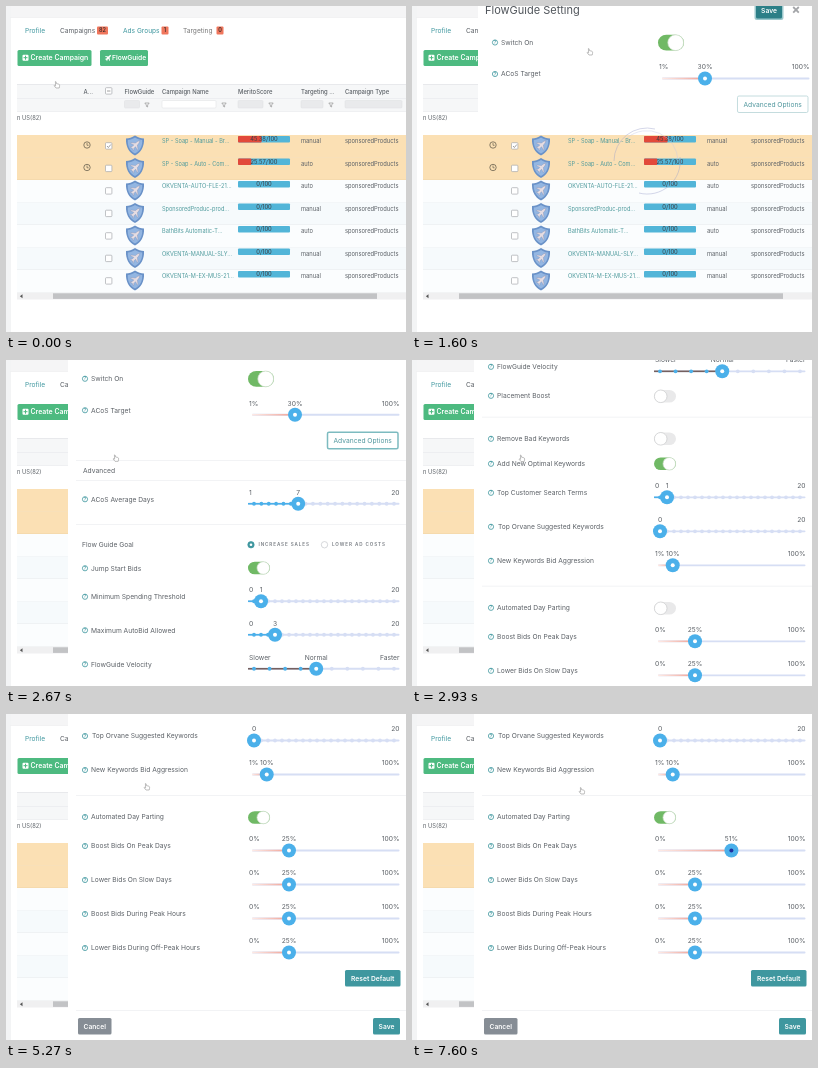
These frames come from a looping animation (400 by 326 pixels, 8000 ms). An HTML page:

```html
<!DOCTYPE html>
<html lang="en">
<head>
<meta charset="utf-8">
<title>Campaign settings</title>
<style>
html, body { margin: 0; width: 100%; height: 100%; overflow: hidden; background: #fff; }
svg { display: block; width: 100vw; height: 100vh; font-family: Inter, Roboto, sans-serif; }
</style>
</head>
<body>
<svg id="stage" viewBox="0 0 400 326"></svg>
<script>
const TEAL = '#3f979f', INK = '#5b6066', BLUE = '#4bb0ea', PALE = '#d6def4', GREEN = '#4dba80';
const stage = document.getElementById('stage');

// ---- drawing helpers, all return markup; text y is the middle of the line ----
const text = (x, y, s, size = 6.7, fill = INK, more = '') =>
  `<text x="${x}" y="${y + size * 0.36}" font-size="${size}" fill="${fill}" ${more}>${s}</text>`;
const rect = (x, y, w, h, fill, more = '') =>
  `<rect x="${x}" y="${y}" width="${w}" height="${h}" fill="${fill}" ${more}/>`;
const circle = (x, y, r, fill, more = '') =>
  `<circle cx="${x}" cy="${y}" r="${r}" fill="${fill}" ${more}/>`;
const path = (d, fill = 'none', more = '') => `<path d="${d}" fill="${fill}" ${more}/>`;
const group = (id, body, more = '') => `<g id="${id}" ${more}>${body}</g>`;
const MID = ' text-anchor="middle"', END = ' text-anchor="end"';
const BOLD = ' font-weight="600"', MEDIUM = ' font-weight="500"';
const stroke = (color, w = 0.7) => ` stroke="${color}" stroke-width="${w}"`;

const PLANE = 'M5-5L2.2-4L.6-2.4L-4-3L-4.6-2.2L-1.2-.6L-3 1.2L-4.6 1L-5 1.6L-2.8 2.8L-1.6 5L-1 4.6L-1.2 3L.6 1.2L2.2 4.6L3 4L2.4-.6L4-2.2Z';
const SHIELD = 'M0-10C3-8 6-7 9-7C9.5 1 6 7 0 10C-6 7-9.5 1-9-7C-6-7-3-8 0-10Z';
const FUNNEL = 'M-2.2-2H2.2L.6 0V2L-.6 1.4V0Z';
const HAND = 'M-1.6-3.4C-.9-3.6-.6-3-.5-1.4L1.8-.8C2.8-.4 2.8.6 2.2 3H-1L-2.8.8C-2.9 0-2 .2-1.4 .8Z';

// ---- campaign page ----
function badge(x, w, s) {
  return rect(x, 20.5, w, 8, '#f0765c', 'rx="1"') + text(x + w / 2, 24.5, s, 5.5, '#43312e', MID + BOLD);
}

function checkbox(y, mark = '') {
  return rect(99.5, y - 3.3, 6.4, 6.4, '#fff', 'rx=".8"' + stroke('#a6aaae')) + path(mark, 'none', stroke('#888', 0.8));
}

function tableRow([name, mode, score], i) {
  const y = 129 + i * 22.5, picked = i < 2;
  let s = rect(11, y, 389, 22.5, picked ? '#fbe0b4' : i % 2 ? '#f6fafc' : '#fbfdfe') +
    rect(11, y + 22, 389, 0.5, picked ? '#efd3a4' : '#e6e8eb');
  if (picked) s += circle(81, y + 10, 3.2, 'none', stroke('#6b6250', 0.8)) +
    path(`M81 ${y + 8}V${y + 10.3}H82.6`, 'none', stroke('#6b6250', 0.7));
  s += checkbox(y + 11, i ? '' : `M101 ${y + 11}l1.4 1.5 2.4-3`);
  s += `<g transform="translate(129 ${y + 10.5})">${path(SHIELD, '#6a92c8')}` +
    `<g transform="scale(.8)">${path(SHIELD, '#93b6e2')}</g>${path(PLANE, '#e6dde2', stroke('#7f8fb4', 0.4))}</g>`;
  s += text(156, y + 6.3, name, 5.6, '#4e9a9c');
  s += rect(232, y + 1, 52, 6.5, '#52b5d8', 'rx="1"');
  if (score) s += rect(232, y + 1, score * 0.52, 6.5, '#e2493a', 'rx="1"');
  return s + text(258, y + 4.3, `${score || 0}/100`, 5.8, '#3a3f45', MID) +
    text(295, y + 6.3, mode, 5.8) + text(339, y + 6.3, 'sponsoredProducts', 5.8);
}

function page() {
  const rows = [
    ['SP - Soap - Manual - Br...', 'manual', 45.38], ['SP - Soap - Auto - Com...', 'auto', 25.57],
    ['OKVENTA-AUTO-FLE-21...', 'auto'], ['SponsoredProduc-prod...', 'manual'],
    ['BathBits Automatic-T...', 'auto'], ['OKVENTA-MANUAL-SLY...', 'manual'],
    ['OKVENTA-M-EX-MUS-21...', 'manual']
  ];
  const heads = [[77.5, 'A...'], [118.5, 'FlowGuide'], [156, 'Campaign Name'], [232, 'MeritoScore'],
    [295, 'Targeting ...'], [339, 'Campaign Type']];
  const filters = [[118.5, 15, 141], [156, 54, 218], [232, 25, 265], [295, 22, 325], [339, 57, 410]];
  return rect(0, 0, 400, 326, '#fff') + rect(0, 0, 400, 11, '#f5f5f6') + rect(0, 0, 5, 326, '#f3f4f5') +
    rect(4.5, 11, 396, 0.6, '#e9eaec') +
    text(19, 24.5, 'Profile', 6.6, TEAL) + text(54, 24.5, 'Campaigns', 6.6) + badge(91, 11, '82') +
    text(117, 24.5, 'Ads Groups', 6.6, TEAL) + badge(155.5, 7, '1') +
    text(177, 24.5, 'Targeting', 6.6, '#777') + badge(210.5, 7, '0') +
    rect(11.5, 44, 74, 16, GREEN, 'rx="1.5"') + rect(16.5, 48.7, 6, 6, '#fff', 'rx="1"') +
    path('M19.5 49.7v4M17.5 51.7h4', 'none', stroke(GREEN, 1)) +
    text(24.5, 52, 'Create Campaign', 6.9, '#fff', BOLD) +
    rect(94, 44, 48, 16, GREEN, 'rx="1.5"') +
    path(PLANE, '#fff', 'transform="translate(102 52) scale(.65)"') + text(106, 52, 'FlowGuide', 6.7, '#fff', BOLD) +
    rect(11, 78, 389, 27.5, '#f6f7f8') + rect(11, 78, 389, 0.6, '#dfe1e4') + rect(11, 92, 389, 0.5, '#e3e5e8') +
    rect(11, 105, 389, 0.5, '#e3e5e8') +
    heads.map(([x, s]) => text(x, 85.5, s, 5.9, INK, MEDIUM)).join('') + checkbox(85, 'M101 85h3.4') +
    filters.map(([x, w, f], i) => rect(x, 94.5, w, 7.5, i == 1 ? '#fff' : '#e9eaec', 'rx="1"' + stroke('#dcdee1', 0.5)) +
      path(FUNNEL, 'none', `transform="translate(${f} 99)"` + stroke('#888', 0.6))).join('') +
    text(11, 112, 'n US(82)', 5.8) + rows.map(tableRow).join('') +
    rect(11, 287, 389, 6.5, '#f0f0f1') + rect(47, 287.3, 324, 5.6, '#c2c3c5') +
    path('M16.5 288.3v4l-2.6-2z', '#555');
}

// ---- settings drawer ----
const help = y => circle(79, y, 2.6, '#fff', stroke(TEAL, 0.8)) + text(79, y, '?', 4.4, TEAL, MID + BOLD);
const label = (y, s) => help(y) + text(85, y, s);
const rule = y => rect(70, y, 330, 0.6, '#e9ebee');
const spot = (lo, hi, v) => 248 + 140 * (v - lo) / (hi - lo);

function button(x, y, w, h, s, fill) {
  return rect(x, y, w, h, fill, 'rx="1.5"') + text(x + w / 2, y + h / 2, s, 6.7, '#fff', MID + BOLD);
}

function toggle(y, on, big = 0) {
  const w = 22 + 4 * big, r = 6.7 + 1.6 * big;
  const x = 242 + r + on * (w - 2 * r);
  return rect(242, y - r + 0.4, w, 2 * r - 0.8, on > 0.5 ? '#70b965' : '#e9e9ea', `rx="${r}"`) +
    circle(x, y, r - 0.4, '#fff', stroke(on > 0.5 ? '#c9dcc6' : '#c9cacc', 0.7));
}

// kind: 'heat' (gradient fill), 'steps' (dots) or 'speed' (dots on a dark fill)
function slider(y, lo, hi, v, kind, names, core = '#fff') {
  const x = spot(lo, hi, v), ty = y + 4.5, unit = kind == 'heat' ? '%' : '';
  const [a, b, c] = names || [lo + unit, Math.round(v) + unit, hi + unit];
  const fill = { heat: 'url(#heat)', steps: BLUE, speed: '#75605f' }[kind];
  const left = kind == 'heat' ? 246 : 242;
  let s = rect(left, ty - 0.9, 393.5 - left, 1.8, PALE, 'rx=".9"') + rect(left, ty - 0.8, x - left, 1.6, fill);
  if (kind != 'heat') for (let i = lo; i <= hi; i++) s += circle(spot(lo, hi, i), ty, 1.9, i < v ? BLUE : PALE);
  if (v > lo) s += text(243, y - 7, a);
  return s + text(x, y - 7, b, 6.7, INK, MID) + text(393.5, y - 7, c, 6.7, INK, END) +
    circle(x, ty, 7, BLUE) + circle(x, ty, 2, core);
}

function radio(x, y, on, s) {
  return circle(x, y, 3.2, on ? TEAL : '#fff', stroke(on ? TEAL : '#c5c8cc')) + (on ? circle(x, y, 1.3, '#fff') : '') +
    text(x + 7.5, y, s, 4.6, '#777c82', BOLD + ' letter-spacing=".9"');
}

const drawerTop = () =>
  text(69, 4, 'FlowGuide Setting', 11, '#50555b') +
  rect(338.5, -4, 29, 18, '#9cc8cc', 'rx="2.5"') + button(340, -3, 26, 15.5, 'Save', '#2c7f87') +
  path('M377.2 1l5.6 5.6m0-5.6l-5.6 5.6', 'none', stroke('#a3a5a8', 1.8)) +
  label(36.5, 'Switch On') + toggle(36.7, 1, 1) +
  label(68, 'ACoS Target') + slider(68, 1, 100, 30, 'heat') +
  `<rect id="option" x="321.5" y="90" width="70.5" height="16.5" rx="1.5" fill="#fff"/>` +
  text(356.7, 98.3, 'Advanced Options', 6.7, '#4f969d', MID);

const drawerMore = () =>
  rule(118) + text(77, 128, 'Advanced') + rule(138) +
  label(157, 'ACoS Average Days') + slider(157, 1, 20, 7, 'steps') + rule(182) +
  text(76, 202, 'Flow Guide Goal') + radio(245, 202.5, true, 'INCREASE SALES') + radio(318.5, 202.5, false, 'LOWER AD COSTS') +
  label(226, 'Jump Start Bids') + toggle(225.7, 1) +
  label(254.5, 'Minimum Spending Threshold') + slider(254.5, 0, 20, 1, 'steps') +
  label(288, 'Maximum AutoBid Allowed') + slider(288, 0, 20, 3, 'steps') +
  label(322, 'FlowGuide Velocity') + slider(322, 0, 9, 4, 'speed', ['Slower', 'Normal', 'Faster']) +
  label(351, 'Placement Boost') + toggle(351.5, 0) + rule(372) +
  label(394, 'Remove Bad Keywords') + toggle(394, 0) +
  label(419, 'Add New Optimal Keywords') + toggle(419, 1) +
  label(448, 'Top Customer Search Terms') + slider(448, 0, 20, 1, 'steps') +
  help(482) + text(86, 482, 'Top Orvane Suggested Keywords') + slider(482, 0, 20, 0, 'steps') +
  label(516, 'New Keywords Bid Aggression') + slider(516, 1, 100, 10, 'heat') + rule(541) +
  label(563, 'Automated Day Parting') + group('parting', '') +
  label(592, 'Boost Bids On Peak Days') + group('boost', '') +
  label(626, 'Lower Bids On Slow Days') + slider(626, 0, 100, 25, 'heat') +
  label(660, 'Boost Bids During Peak Hours') + slider(660, 0, 100, 25, 'heat') +
  label(694, 'Lower Bids During Off-Peak Hours') + slider(694, 0, 100, 25, 'heat') +
  button(339, 716, 55.5, 16.5, 'Reset Default', TEAL) + rule(756) +
  button(72, 764, 33.5, 16.5, 'Cancel', '#868d95') + button(367, 764, 27, 16.5, 'Save', TEAL);

stage.innerHTML =
  `<defs><linearGradient id="heat"><stop stop-color="#fdebe7"/><stop offset="1" stop-color="#f0a093"/></linearGradient>
  <clipPath id="unfold"><rect id="reveal" x="62" y="107" width="338" height="0"/></clipPath></defs>` +
  page() +
  group('spinner', path('M-33 0A33 33 0 0 1 8-32M33-4A33 33 0 0 1-8 32', 'none', stroke('#9a9fcb', 0.7)) +
    path('M-20-23A31 31 0 0 1 31 0', 'none', stroke('#c3c7e6', 0.7)), 'opacity=".6"') +
  group('drawer', `<rect id="sheet" x="62" width="345" fill="#fff"/>` +
    group('content', drawerTop() + group('more', drawerMore(), 'clip-path="url(#unfold)"'))) +
  group('cursor', path(HAND, '#fff', stroke('#929292', 0.6)));

// ---- timeline: [ms, value, ...] keys, linear between ----
const LOOP = 8000, STEP = 200 / 3;
const tracks = {
  cursor: [[0, 51, 79], [330, 42, 77], [790, 42, 77], [1270, 178, 46], [1610, 178, 46], [2270, 110, 98], [3530, 110, 99],
    [4060, 125, 49], [4200, 125, 49], [4330, 125, 54], [4800, 125, 54], [5260, 141, 73], [5660, 141, 73],
    [6130, 159, 77], [6200, 159, 77], [7060, 171, 78], [7130, 171, 78], [7260, 172, 78], [7460, 172, 78], [7600, 170, 77]],
  scroll: [[2600, 0], [2666, 17], [2933, 315], [3066, 395], [3200, 395], [3400, 460]],
  boost: [[5660, 25], [6130, 39], [6200, 39], [7060, 52], [7130, 52], [7260, 53], [7460, 53], [7600, 51]],
  parting: [[5060, 0], [5260, 1]],
  unfold: [[2130, 0], [2460, 700]]
};

function at(keys, t) {
  const n = keys.findIndex(k => k[0] > t);
  if (n < 1) return (n ? keys[keys.length - 1] : keys[0]).slice(1);
  const a = keys[n - 1], b = keys[n], p = (t - a[0]) / (b[0] - a[0]);
  return a.slice(1).map((v, i) => v + (b[i + 1] - v) * p);
}

const el = id => document.getElementById(id);
const set = (id, name, value) => el(id).setAttribute(name, value);
const move = (id, x, y, more = '') => set(id, 'transform', `translate(${x} ${y})${more}`);
const show = (id, on) => set(id, 'visibility', on ? 'visible' : 'hidden');

function draw(t) {
  const slide = Math.min(1, Math.max(0, (t - 1200) / 517));
  move('drawer', 345 * (1 - slide) ** 3, 0);
  show('drawer', t >= 1200);
  set('sheet', 'height', t < 1660 ? 107 : 326);
  move('content', 0, -at(tracks.scroll, t)[0]);
  set('reveal', 'height', at(tracks.unfold, t)[0]);
  const focus = t > 2060;
  set('option', 'stroke', focus ? '#7dbbc0' : '#b5d3d6');
  set('option', 'stroke-width', focus ? 1.5 : 0.8);
  show('spinner', t > 1060 && t < 1660);
  move('spinner', 235, 155, ` rotate(${(t - 1600) * 0.36})`);
  el('parting').innerHTML = toggle(563.5, at(tracks.parting, t)[0]);
  el('boost').innerHTML = slider(592, 0, 100, at(tracks.boost, t)[0], 'heat', null, t > 5700 ? '#1d2fa0' : '#fff');
  move('cursor', ...at(tracks.cursor, t));
}

// The picture steps at 15 per second; 5 ms absorbs times rounded to 10 ms.
function tick() {
  const t = performance.now() % LOOP;
  draw(Math.floor((t + 5) / STEP) * STEP);
  requestAnimationFrame(tick);
}
tick();
</script>
</body>
</html>
```
